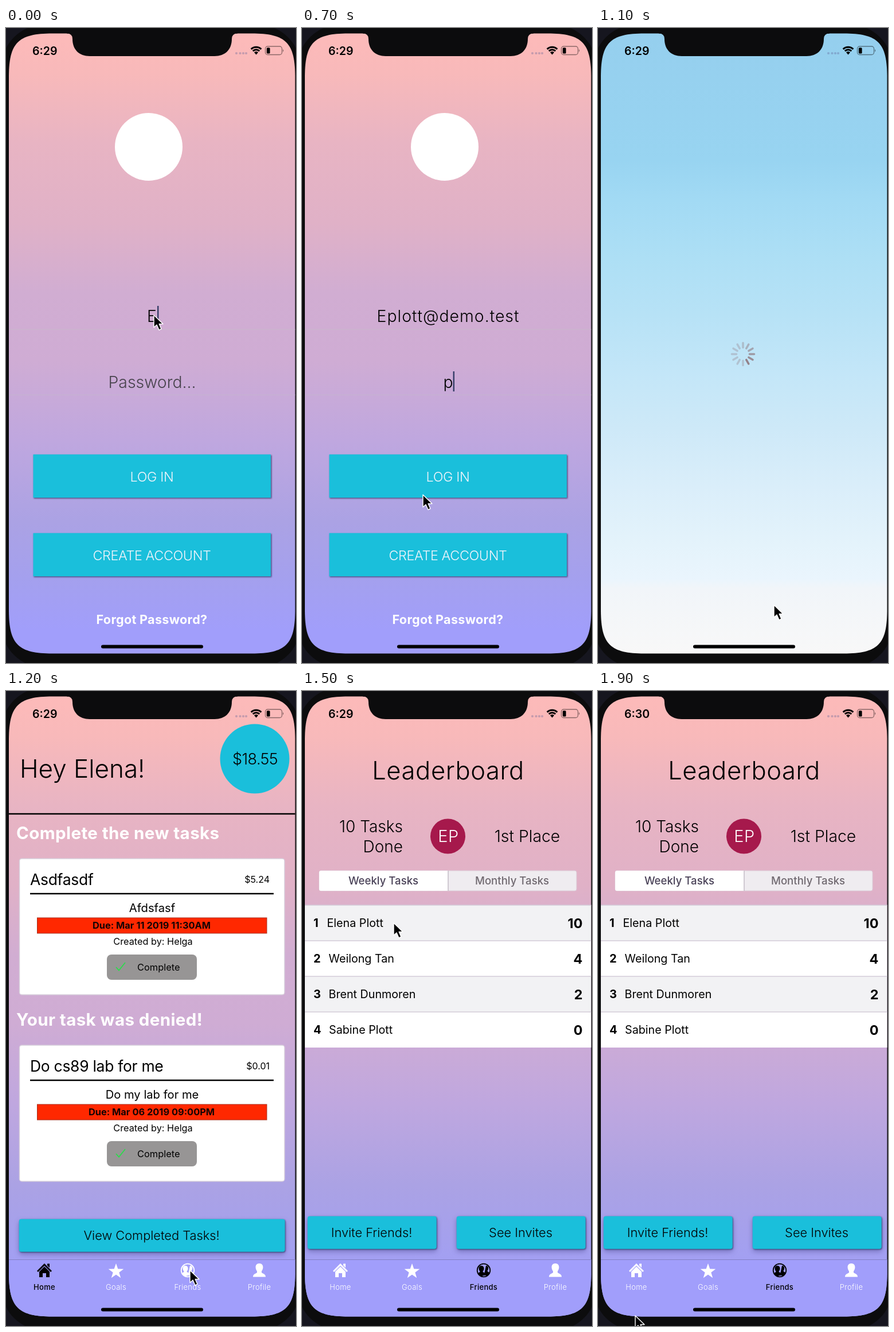
An HTML page for the animation above (2000 ms loop, 506x1106 px).

```html
<!DOCTYPE html>
<html lang="en">
<head>
<meta charset="utf-8">
<title>Task app walkthrough</title>
<style>
html, body { margin: 0; width: 100%; height: 100%; overflow: hidden; background: #15151d; }
svg { display: block; width: 506px; height: 1106px; font-family: Inter, "Open Sans", sans-serif; }
text { white-space: pre; }
</style>
</head>
<body>
<svg id="stage" viewBox="0 0 506 1106" xmlns="http://www.w3.org/2000/svg"></svg>
<script>
const LOOP = 2000, STEP = 100;
const CYAN = '#1abfdb', LILAC = '#a19efb', WINE = '#a6194c';
const EMAIL = 'Eplott@demo.test', FIRST = 'Elena', FULL = 'Elena Plott', MAKER = 'Helga';

// Markup helpers
const attrs = o => Object.entries(o).map(([k, v]) => ` ${k}="${v}"`).join('');
const text = (x, y, str, size, { a = 'start', w = 400, fill = '#000', ls = 0, id = '' } = {}) =>
  `<text${attrs({ x, y, 'font-size': size, 'text-anchor': a, 'font-weight': w, fill, 'letter-spacing': ls })}${id && ` id="${id}"`}>${str}</text>`;
const mid = (x, y, str, size, o = {}) => text(x, y, str, size, { a: 'middle', ...o });
const end = (x, y, str, size, o = {}) => text(x, y, str, size, { a: 'end', ...o });
const rect = (x, y, width, height, fill, o = {}) => `<rect${attrs({ x, y, width, height, fill, ...o })}/>`;
const circle = (cx, cy, r, fill, o = {}) => `<circle${attrs({ cx, cy, r, fill, ...o })}/>`;
const path = (d, fill, o = {}) => `<path${attrs({ d, fill, ...o })}/>`;
const line = (x1, x2, y, stroke, w) => path(`M${x1} ${y}H${x2}`, 'none', { stroke, 'stroke-width': w });
const gradient = (id, stops) =>
  `<linearGradient id="${id}" gradientUnits="userSpaceOnUse" x1="0" y1="0" x2="0" y2="1106">${
    stops.map(([y, c]) => `<stop offset="${y / 1106}" stop-color="${c}"/>`).join('')}</linearGradient>`;
const screen = (id, body) => `<g id="${id}">${body}</g>`;
const polar = (cx, cy, r, deg) => {
  const a = deg * Math.PI / 180;
  return `${(cx + r * Math.sin(a)).toFixed(2)} ${(cy - r * Math.cos(a)).toFixed(2)}`;
};

// Rounded box whose corners ease into the sides
function squircle(l, t, r, b, span, k) {
  return `M${l} ${t + span}C${l} ${t + k} ${l + k} ${t} ${l + span} ${t}H${r - span}` +
    `C${r - k} ${t} ${r} ${t + k} ${r} ${t + span}V${b - span}C${r} ${b - k} ${r - k} ${b} ${r - span} ${b}` +
    `H${l + span}C${l + k} ${b} ${l} ${b - k} ${l} ${b - span}Z`;
}

const LIGHT = { w: 350 }, BOLD = { w: 700 };
const dusk = rect(0, 0, 506, 1106, 'url(#dusk)');

function flatButton(y, label) {
  return rect(48.5, y + 1, 415, 75.5, '#2c3560', { opacity: .75, filter: 'url(#edge)' }) +
    rect(47.5, y - .3, 414.5, 75.3, CYAN) +
    mid(254.5, y + 47, label, 23.4, { w: 350, fill: '#f0f4fb', ls: -.4 });
}

function softButton(x, y, w, label) {
  return rect(x, y + 4, w, 57, '#504a90', { rx: 4, opacity: .55, filter: 'url(#blur)' }) +
    rect(x + .7, y + .7, w, 57.3, '#25345c', { rx: 4, opacity: .75, filter: 'url(#edge)' }) +
    rect(x - .3, y - .3, w, 57, CYAN, { rx: 4 }) +
    mid(x + w / 2 - 1, y + 36, label, 21.8, LIGHT);
}

function avatar(x, y) {
  return circle(x, y, 30.5, WINE) + mid(x + 1, y + 10, 'EP', 29, { w: 300, fill: '#fff', ls: .5 });
}

function card(y, title, price, note, due) {
  return rect(23.5, y, 462.5, 237, '#fff', { rx: 4, stroke: '#d8cfdc', 'stroke-width': 1.5 }) +
    text(42, y + 46, title, 26.5, { ls: -.3 }) + end(460, y + 42, price, 16) +
    line(42, 467, y + 61, '#000', 2.5) +
    mid(255, y + 93, note, 20.2) +
    rect(54.5, y + 103, 400.5, 27, '#ff2800', { stroke: '#a8301c', 'stroke-width': 1 }) +
    mid(254, y + 122, due, 16.4, { w: 700, fill: '#150404' }) +
    mid(256.5, y + 150, `Created by: ${MAKER}`, 16.3) +
    rect(176, y + 167, 157, 44, '#979595', { rx: 8 }) +
    path(`M192 ${y + 189}l5 5.500 11-13.500`, 'none', { stroke: '#2bdc4b', 'stroke-width': 1.8 }) +
    text(229, y + 195, 'Complete', 16.4);
}

// Tab bar
const star = Array.from({ length: 10 }, (_, i) => polar(192, 1011, i % 2 ? 5.6 : 14, i * 36)).join('L');
const icons = [
  c => path('M54 1010L67 997l13 13-2 2-11-11-11 11zM58 1011.500l9-9 9 9V1021h-6v-7h-6v7h-6zM72 997.500h4v7l-4-4z', c),
  c => path(`M${star}Z`, c),
  c => circle(317, 1009, 11.3, 'none', { stroke: c, 'stroke-width': 1.8 }) +
    path('M321 1001c5 0 5 6 2.500 9 0 2 4 2 4 4l-4 4h-6zM313 1001c5.500 0 5.500 7 2.500 10 0 2 5 2 5.500 4.500q-4 4-8 3.500-4-.5-6.500-4c1-2.500 4-2 4-4-3-3-3-10 2.500-10z', c),
  c => path('M442 997c8 0 7.500 9 4 13.500v2.500c2 2 7 2 7 7.500h-22c0-5.500 5-5.500 7-7.500v-2.500c-3.500-4.500-4-13.500 4-13.500z', c)
];
function tabs(active) {
  return rect(0, 990, 506, 116, LILAC) + line(0, 506, 990.5, '#8480c4', 1.2) +
    ['Home', 'Goals', 'Friends', 'Profile'].map((label, i) => {
      const on = i === active, c = on ? '#000' : '#fff';
      return icons[i](c) + mid(67 + 125 * i, 1043, label, 13, { w: on ? 500 : 350, fill: c, ls: .3 });
    }).join('');
}

// Screens
const login = dusk +
  circle(249, 207, 59, '#fff') +
  line(0, 506, 525, '#c9b9cb', 1.2) + line(0, 506, 639, '#c6b5cf', 1.2) +
  mid(255, 512, '', 28.4, { w: 350, id: 'email', ls: 1 }) +
  mid(255, 627, '', 28.4, { w: 350, id: 'pass' }) +
  rect(0, 0, 2.5, 35, '#39406a', { id: 'caret' }) +
  flatButton(743, 'LOG IN') + flatButton(880, 'CREATE ACCOUNT') +
  mid(254.5, 1038, 'Forgot Password?', 21.6, { w: 700, fill: '#fff', ls: .3 });

const spokes = Array.from({ length: 12 }, (_, i) => {
  const age = (17 - i) % 12;
  return path(`M${polar(253, 568, 11.5, i * 30)}L${polar(253, 568, 19.5, i * 30)}`, 'none',
    { stroke: '#94828a', 'stroke-width': 3.6, 'stroke-linecap': 'round', opacity: Math.max(.35, 1 - age * .12) });
}).join('');
const loading = rect(0, 0, 506, 1106, 'url(#sky)') + spokes;

const heading = (y, str) => text(18, y, str, 29.5, { w: 700, fill: '#fff', ls: .4 });
const home = dusk +
  text(24, 151, `Hey ${FIRST}!`, 44, LIGHT) +
  circle(434, 118, 60.5, CYAN) + mid(434.5, 128, '$18.55', 27, { w: 350, ls: -.5 }) +
  line(0, 506, 214, '#000', 2.5) +
  heading(258, 'Complete the new tasks') +
  card(292, 'Asdfasdf', '$5.24', 'Afdsfasf', 'Due: Mar 11 2019 11:30AM') +
  heading(583, 'Your task was denied!') +
  card(617, 'Do cs89 lab for me', '$0.01', 'Do my lab for me', 'Due: Mar 06 2019 09:00PM') +
  softButton(23, 920, 464, 'View Completed Tasks!') + tabs(0);

const ranks = [[FULL, 10, 43.5], ['Weilong Tan', 4, 46.5], ['Brent Dunmoren', 2, 46.5], ['Sabine Plott', 0, 47]];
const board = dusk +
  mid(255, 154, 'Leaderboard', 43.5, { w: 350, ls: .6 }) +
  end(176, 246, '10 Tasks', 28, LIGHT) + end(176, 281, 'Done', 28, LIGHT) +
  avatar(254.5, 253) + mid(393, 263, '1st Place', 28.4, LIGHT) +
  rect(30, 313, 449, 35, '#efecf0', { rx: 3, stroke: '#dccfda', 'stroke-width': 1 }) +
  path('M33 313H254.500V348H33q-3 0-3-3V316q0-3 3-3z', '#fff') +
  path('M255 313V348', 'none', { stroke: '#b9b1bb', 'stroke-width': 1.2 }) +
  mid(142, 337, 'Weekly Tasks', 18.6, { w: 500, fill: '#4a4258' }) +
  mid(366.5, 337, 'Monthly Tasks', 18.6, { w: 500, fill: '#706970' }) +
  ranks.map(([name, n, x], i) => {
    const y = 373 + 62 * i;
    return rect(0, y, 506, 62, i % 2 ? '#fff' : '#f2f2f4') + line(0, 506, y, '#d3cbd8', 1.4) +
      text(20, y + 38, i + 1, 20, BOLD) + text(x, y + 38, name, 19.7) +
      end(489.5, y + 39.5, n, 23.5, BOLD);
  }).join('') +
  softButton(10, 915, 225, 'Invite Friends!') + softButton(270, 915, 225, 'See Invites') + tabs(2);

const ring = (cx, c) => circle(cx, 786, 88, 'none', { stroke: c, 'stroke-width': 15 });
const profile = dusk +
  path('M30.500 77.500L19 89l11.500 11.500', 'none', { stroke: '#4a8ed4', 'stroke-width': 3.6 }) +
  text(39, 96.5, 'Back', 20, { fill: '#4a86cc' }) +
  mid(254.5, 99, FULL, 36.5, { w: 700, ls: .5 }) +
  text(23, 168, '10 Tasks Done', 19.6, BOLD) + avatar(242.5, 162) + text(321, 168, '1st Place', 19.6, BOLD) +
  mid(255, 241, 'Tasks Completed in Past Month', 20.2, BOLD) +
  path('M20 477V471H368C380 471 385 468 391 468C396 468 399 474 400.500 477Z' +
    'M411 477C423 462 431 277 440 277C449 277 452 440 460 477Z' +
    'M472.500 477C476 468 478 464.500 482 464.500C486 464.500 487 469 490 471V477Z', '#8f87c8') +
  ['2/10', '2/17', '2/24', '3/3', '3/10'].map((d, i) => mid(45 + 108.4 * i, 499.5, d, 13.7, { w: 600 })).join('') +
  mid(136, 557, 'Completion Percentage', 16.3, BOLD) + mid(373.5, 557, 'Amount to Next Goal', 16.3, BOLD) +
  ring(136, '#b5b3bb') +
  path(`M${polar(136, 786, 88, 184.6)}A88 88 0 0 1 ${polar(136, 786, 88, 364.6)}`, 'none',
    { stroke: '#25dc25', 'stroke-width': 15, 'stroke-linecap': 'round' }) +
  mid(135, 768, '52.6%', 22.8, { w: 700, fill: '#25dc25' }) +
  ring(374, '#938fd2') + rect(373.5, 866.5, 10.5, 15, '#4a70a0', { rx: 5 }) +
  mid(378, 768, '1.85%', 22.8, { w: 700, fill: '#4a6b9c' }) + tabs(2);

// Phone chrome
const arc = r => `M${polar(436.5, 46, r, -44)}A${r} ${r} 0 0 1 ${polar(436.5, 46, r, 44)}`;
const status = text(46, 46.5, '6:29', 19.6, { w: 600, id: 'clock' }) +
  [402, 408.5, 414, 419].map(x => circle(x, 44, 2.1, '#5f6296', { opacity: .35 })).join('') +
  path(arc(12.7) + arc(8.2), 'none', { stroke: '#000', 'stroke-width': 3 }) +
  path(`M436.500 46.500L${polar(436.5, 46, 5, -44)}A5 5 0 0 1 ${polar(436.5, 46, 5, 44)}Z`, '#000') +
  rect(452.5, 32, 29, 14.5, 'none', { rx: 4, stroke: '#000', 'stroke-width': 1.3, opacity: .45 }) +
  path('M483 37q2.500 2.200 0 4.800z', '#000', { opacity: .5 }) +
  rect(454.8, 34.2, 5.8, 10.2, '#000', { rx: 1.5 });
const notch = path('M106 0V9.500Q116 9.500 116 19C116 38 128 49 146 49H364C382 49 394 38 394 19Q394 9.500 404 9.500V0Z', '#0c0c0d');

const stage = document.getElementById('stage');
stage.innerHTML = `<defs>${
  gradient('dusk', [[9, '#fdbab9'], [80, '#f8b9ba'], [200, '#e8b4c3'], [340, '#e0b1c7'], [460, '#d1add2'],
    [580, '#cfacd4'], [720, '#bfa7df'], [860, '#aba2e4'], [960, '#a4a0ee'], [1050, '#a19efb']])}${
  gradient('sky', [[9, '#95cfee'], [230, '#98d4f1'], [300, '#a2daf4'], [400, '#addff5'], [500, '#b7e2f6'], [600, '#c3e6f8'],
    [700, '#cee9f8'], [800, '#daeefa'], [900, '#e4f3fb'], [960, '#eaf5fd'], [975, '#f1f5f9'], [1089, '#f8f8f8']])}
  <clipPath id="glass"><path d="${squircle(5, 9.5, 504.5, 1089.5, 76, 16)}"/></clipPath>
  <filter id="edge" x="-5%" y="-10%" width="110%" height="120%"><feGaussianBlur stdDeviation=".8"/></filter>
  <filter id="blur" x="-10%" y="-40%" width="120%" height="180%"><feGaussianBlur stdDeviation="5"/></filter></defs>` +
  rect(0, 0, 506, 1106, '#16161f') + rect(-8, -6, 522, 1120, '#0c0c0d', { rx: 75 }) +
  `<g clip-path="url(#glass)">` +
  screen('login', login) + screen('loading', loading) + screen('home', home) +
  screen('board', board) + screen('profile', profile) + status + '</g>' + notch +
  rect(166, 1074.5, 178, 6, '#000', { rx: 3 }) +
  path('M0 0V21.500L5 17L9 26L13 24.200L9.200 15.500H16Z', '#000',
    { id: 'mouse', stroke: '#fff', 'stroke-width': 1.4, 'stroke-linejoin': 'round' });

// Timeline
const scenes = [[0, 'login'], [1100, 'loading'], [1200, 'home'], [1300, 'board'], [1600, 'profile'], [1900, 'board']];
const moves = [[0, 258, 500], [400, 258, 500], [600, 236, 622], [700, 211, 813], [900, 212, 790], [1000, 225, 800],
  [1100, 307, 1005], [1200, 321, 1009], [1400, 233, 458], [1500, 160, 404], [1700, 73, 107], [1800, 54, 92], [1900, 65, 1088]];
const $ = id => document.getElementById(id);
const names = [...new Set(scenes.map(s => s[1]))];

function mouseAt(t) {
  const i = moves.findLastIndex(m => m[0] <= t);
  const a = moves[i], b = moves[i + 1] || a;
  const k = a === b ? 0 : (t - a[0]) / (b[0] - a[0]);
  return [a[1] + (b[1] - a[1]) * k, a[2] + (b[2] - a[2]) * k];
}

function placeCaret(el, y) {
  $('caret').setAttribute('x', 255 + el.getComputedTextLength() / 2);
  $('caret').setAttribute('y', y);
}

function drawLogin(t) {
  const email = $('email'), pass = $('pass');
  email.textContent = EMAIL.slice(0, 1 + 3 * t / STEP);
  const typed = Math.min(8, 1 + 3 * (t - 700) / STEP);
  pass.textContent = t < 700 ? 'Password...' : t < 800 ? 'p' : '•'.repeat(typed);
  pass.setAttribute('fill', t < 700 ? '#47424c' : '#000');
  $('caret').style.display = t === 600 ? 'none' : '';
  if (t < 600) placeCaret(email, 484);
  else placeCaret(pass, 598);
}

let last = -1;
function draw(now) {
  const t = Math.floor(now % LOOP / STEP) * STEP;
  if (t !== last) {
    last = t;
    const scene = scenes.findLast(s => s[0] <= t)[1];
    names.forEach(n => { $(n).style.display = n === scene ? '' : 'none'; });
    if (scene === 'login') drawLogin(t);
    $('clock').textContent = t < 1600 ? '6:29' : '6:30';
    $('mouse').setAttribute('transform', `translate(${mouseAt(t)})`);
  }
  requestAnimationFrame(() => draw(performance.now()));
}
draw(performance.now());
</script>
</body>
</html>
```
